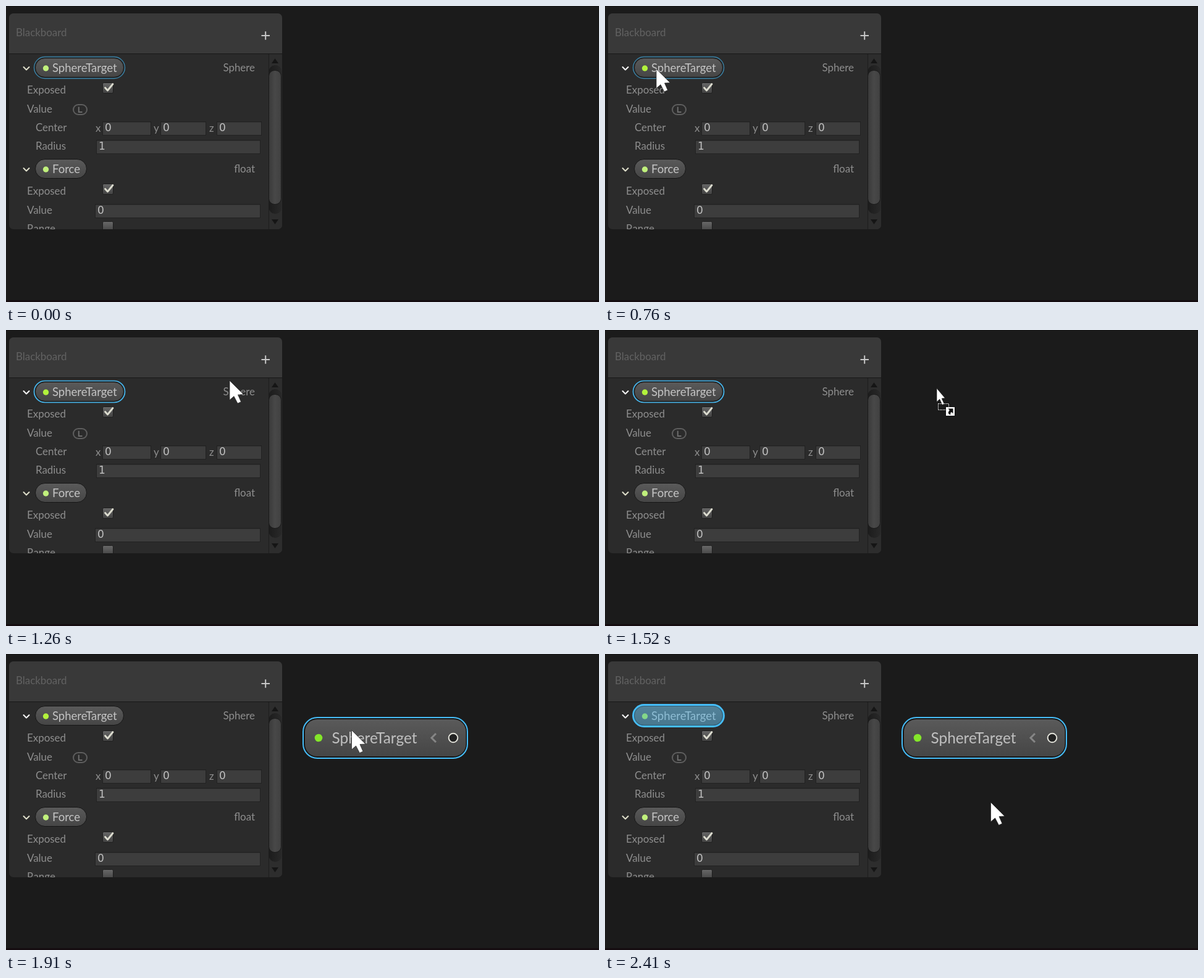
Recreate the animation shown at these times as an HTML page. Size 960 by 480 pixels, loop 2.45 s.

```html
<!DOCTYPE html>
<html lang="en">
<head>
<meta charset="utf-8">
<title>Blackboard drag</title>
<style>
  html, body { margin: 0; width: 100%; height: 100%; overflow: hidden; background: #1b1b1b; }
  svg { display: block; width: 960px; height: 480px; }
  text { font: 16.9px Lato, "Noto Sans", sans-serif; fill: #8e8e8e; }
  .num { font: 17px "DejaVu Sans", sans-serif; fill: #c0c0c0; }
  .pill { font-size: 18.5px; fill: #c4c4c4; }
  .node { font-size: 24.4px; fill: #c0c0c0; }
  .end { text-anchor: end; }
  .line { fill: none; stroke-linecap: round; stroke-linejoin: round; }
</style>
</head>
<body>
<svg viewBox="0 0 960 480">
  <defs>
    <linearGradient id="body" x2="0" y2="1">
      <stop stop-color="#5a5a5a"/><stop offset="1" stop-color="#454545"/>
    </linearGradient>
    <linearGradient id="thumb">
      <stop stop-color="#3a3a3a"/><stop offset=".5" stop-color="#484848"/><stop offset="1" stop-color="#404040"/>
    </linearGradient>
    <linearGradient id="track">
      <stop stop-color="#1c1c1c"/><stop offset="1" stop-color="#292929"/>
    </linearGradient>
    <linearGradient id="box" x2="0" y2="1">
      <stop stop-color="#686868"/><stop offset="1" stop-color="#414141"/>
    </linearGradient>
    <clipPath id="panel"><rect x="5" y="12" width="442" height="350" rx="7"/></clipPath>
    <rect id="check" x=".5" y=".5" width="17" height="17" rx="2" fill="url(#box)" stroke="#1d1d1d"/>
    <path id="tick" class="line" d="M4.500 8.500 8.500 13 17 2.500" stroke="#dcdccf" stroke-width="2.800"/>
    <path id="fold" class="line" d="M-4.500-2 0 2.500 4.500-2" stroke-width="2"/>
  </defs>

  <rect width="960" height="480" fill="#1b1b1b"/>
  <rect width="960" height="1" fill="#121212"/>
  <rect x="959" width="1" height="480" fill="#141414"/>
  <rect y="477" width="960" height="3" fill="#150d10"/>

  <g clip-path="url(#panel)">
    <rect x="5" y="12" width="442" height="350" fill="#2b2b2b"/>
    <rect x="5" y="12" width="442" height="65" fill="#393939"/>
    <rect x="5" y="77" width="442" height="1" fill="#161616"/>
    <text x="16" y="49" style="fill:#626262">Blackboard</text>
    <path d="M413.500 48H427M420.200 41.200V54.800" stroke="#c8c8c8" stroke-width="2"/>

    <rect x="425" y="78" width="22" height="284" fill="#2d2d2d"/>
    <rect x="425" y="78" width="1" height="284" fill="#1d1d1d"/>
    <rect x="425.500" y="96" width="21" height="241" rx="10" fill="url(#track)"/>
    <rect x="425.500" y="104.500" width="20" height="217" rx="9" fill="url(#thumb)" stroke="#1a1a1a"/>
    <path d="M430 93 435.500 85 441 93ZM430 346 435.500 354 441 346Z" fill="#151515"/>

    <g id="rows"></g>
    <g id="pills"></g>
  </g>

  <rect id="ring" x="45.500" y="82.500" width="147" height="35" rx="17.500"/>

  <g id="node">
    <rect x="481" y="103" width="266" height="66" rx="23" fill="#171717" stroke="#46bdf8" stroke-width="2"/>
    <rect x="484" y="106" width="260.500" height="60" rx="20" fill="url(#body)"/>
    <circle cx="506" cy="136" r="6.300" fill="#84e62a"/>
    <text class="node" x="527.500" y="144.500">SphereTarget</text>
    <path d="M696 129 689 136 696 143" fill="none" stroke="#868686" stroke-width="3"/>
    <circle cx="724" cy="136" r="7.300" fill="#222" stroke="#e2e2da" stroke-width="2"/>
  </g>

  <path id="arrow" d="M0 0V31.500L7 25.500 13 37 18.500 34.500 13.500 23 22.500 22.500Z" fill="#fff" stroke="#222" stroke-width=".7"/>
  <g id="drag">
    <path d="M0-.5V21.500L4.800 17.200 9 26.500 12.200 25 8.200 16 13.500 15.500Z" fill="#fff" stroke="#111" stroke-width=".6"/>
    <path d="M2.500 24.500H19.500V34.500H2.500Z" fill="none" stroke="#fff" stroke-dasharray="1.500 1"/>
    <rect x="14.500" y="29.500" width="15" height="15" fill="#fff" stroke="#111"/>
    <path d="M18.500 32.500H26.500V40.500L24 38Q21.500 39 22.500 42.500 16 41 20.800 35Z" fill="#111"/>
  </g>
</svg>

<script>
const $ = id => document.getElementById(id);
const label = (x, y, s, cls = '') => `<text class="${cls}" x="${x}" y="${y}">${s}</text>`;
const field = (x, y, w, value, pad = 4) =>
  `<rect x="${x}" y="${y}" width="${w}" height="23" fill="#222"/>` +
  `<rect x="${x + 1}" y="${y + 1.5}" width="${w - 2}" height="20.5" fill="#3d3d3d"/>` +
  label(x + pad, y + 16, value, 'num');
const check = (y, on) =>
  `<use href="#check" x="156" y="${y}"/>` + (on ? `<use href="#tick" x="156" y="${y}"/>` : '');
const pill = (id, y, w, name, type) =>
  `<use id="${id}Fold" href="#fold" x="33" y="${y + 1}" stroke="#e0e0cc"/>` +
  `<rect x="47.5" y="${y - 15.5}" width="${w}" height="31" rx="15.5" fill="url(#body)" stroke="#161616"/>` +
  `<circle id="${id}Dot" cx="64.5" cy="${y + 1}" r="4.7" fill="#c0f07c"/>` +
  label(75, y + 6.5, name, 'pill') + label(403, y + 6, type, 'end');

$('rows').innerHTML =
  label(34, 142, 'Exposed') + check(124, true) +
  label(34, 173, 'Value') +
  '<rect x="109" y="160" width="22" height="16" rx="8" fill="none" stroke="#5e5e5e" stroke-width="2"/>' +
  '<path d="M117.800 163.500V172H123.500" fill="none" stroke="#6c6c6c" stroke-width="2"/>' +
  label(48, 203, 'Center') +
  [['x', 145, 156, 79], ['y', 239, 250, 74], ['z', 329, 341, 73]]
    .map(([s, x, fx, w]) => label(x, 204, s) + field(fx, 187, w, 0)).join('') +
  label(48, 233, 'Radius') + field(146, 217, 266, 1) +
  label(34, 306, 'Exposed') + check(288, true) +
  label(34, 337, 'Value') + field(144, 321, 268, 0) +
  label(34, 367, 'Range') + check(349, false);

$('pills').innerHTML =
  pill('sphere', 100, 143, 'SphereTarget', 'Sphere') +
  pill('force', 264, 83, 'Force', 'float');

// Pointer: time, x, y; each place is held until the next.
const LOOP = 2450;
const path = [
  [210, 422, 466], [270, 322, 364], [330, 186, 232], [390, 66, 128],
  [450, 5, 86], [520, 7, 83], [580, 38, 90], [640, 67, 98], [690, 81, 101],
  [760, 83, 102],
  [1070, 107, 99], [1130, 188, 92], [1190, 284, 85], [1260, 362, 82],
  [1330, 424, 79], [1390, 474, 81], [1450, 511, 87], [1520, 537, 95], [1590, 548, 106],
  [1660, 553, 114], [1730, 556, 119], [1850, 558, 122], [1910, 559.5, 123.5],
  [1960, 562, 127], [2060, 565, 131], [2160, 567, 134],
  [2230, 579, 156], [2290, 597, 190], [2350, 613, 220], [2410, 624.5, 240.5]
];
// Outline of the first pill: time, colour, width, fill.
const rings = [
  [0, '#3a83a8', 1.4, 'none'],
  [1070, '#46b8f0', 1.7, 'none'],
  [1730, 'none', 0, 'none'],
  [2060, '#46bdf8', 2.8, 'rgba(76,180,230,.45)']
];
const at = (table, t) => table.filter(row => row[0] <= t).pop();
const show = (el, on) => el.setAttribute('visibility', on ? 'visible' : 'hidden');
const start = performance.now();

function draw() {
  const t = (performance.now() - start) % LOOP;
  const spot = at(path, t);
  const dragging = t >= 1390 && t < 1730;
  show($('arrow'), spot && !dragging);
  show($('drag'), dragging);
  if (spot) {
    const move = `translate(${spot[1]} ${spot[2]})`;
    $('arrow').setAttribute('transform', move);
    $('drag').setAttribute('transform', move);
  }
  show($('node'), t >= 1730);
  const [, color, width, fill] = at(rings, t);
  $('ring').setAttribute('stroke', color);
  $('ring').setAttribute('stroke-width', width);
  $('ring').setAttribute('fill', fill);
  const lit = t >= 580;
  $('sphereDot').setAttribute('fill', lit ? '#b2f23c' : '#c0f07c');
  $('sphereFold').setAttribute('stroke', lit ? '#fff' : '#e0e0cc');
  requestAnimationFrame(draw);
}
draw();
</script>
</body>
</html>
```
